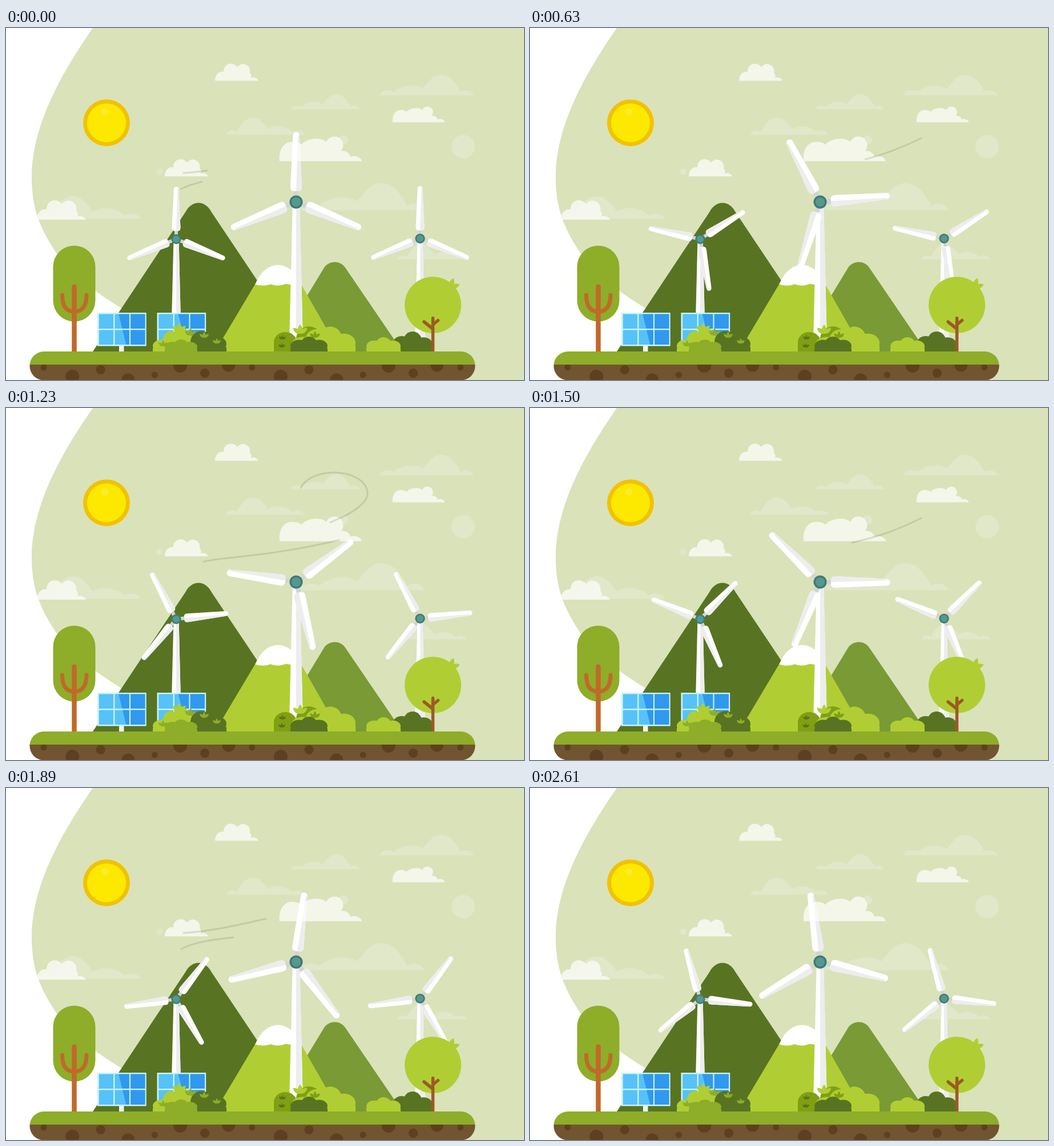
An HTML page that plays this animation: 907 by 617 pixels, repeating every 2.64 s.

```html
<!DOCTYPE html>
<html lang="en">
<head>
<meta charset="utf-8">
<title>Wind farm</title>
<style>
html, body { margin: 0; width: 100%; height: 100%; overflow: hidden; background: #fff; }
svg { display: block; width: 100%; height: 100%; }
.mist { fill: #e1e7c9; }
.cloud { fill: #fff; fill-opacity: .69; }
.light { fill: #b0ce33; }
.olive { fill: #8ead29; }
.moss { fill: #80a012; }
.dark { fill: #587422; }
.grey { fill: #ededee; }
.wind { fill: none; stroke: #5a6432; stroke-opacity: .18; stroke-width: 3; stroke-linecap: round; }
.branch { fill: none; stroke-linecap: round; stroke-linejoin: round; }
</style>
</head>
<body>
<svg viewBox="0 0 907 617">
  <defs>
    <path id="hill" d="M0 36C3 27 15 25 26 30C38 18 62 15 76 24C88 8 96 0 108 0C122 0 133 12 142 30C150 25 161 27 165 36Z"/>
    <path id="puff" d="M0 30C0 20 6 13 15 14C15 5 21 0 28 0C33 0 37 3 39 6C41 3 45 .5 49 .5C58 1 63 9 61 16C64 19 64 22 63 25C68 23 74 25 76 30Z"/>
    <path id="bank" d="M0 43C-2 22 8 9 22 9C30 9 35 11 38 14C48 2 72 0 82 9C86 -1 98 -3 106 3C114 11 112 22 107 25C116 24 123 29 124 35C133 32 143 36 144 43Z"/>
    <path id="leaf" d="M0 0Q-6 -6 0 -13Q6 -6 0 0Z"/>
    <g id="blade">
      <path fill="#d3d4d4" d="M-4 -8H4V-22H-4Z"/>
      <path fill="#fff" d="M-10 -27Q-10 -19 -4 -19H4Q10 -19 10 -27L5.7 -117A5.7 5.7 0 0 0 -5.7 -117Z"/>
      <path class="grey" d="M0 -19H4Q10 -19 10 -27L5.7 -116L3 -117Z"/>
    </g>
    <g id="rotor">
      <use href="#blade"/>
      <use href="#blade" transform="rotate(112)"/>
      <use href="#blade" transform="rotate(-112) scale(-1 1)"/>
    </g>
    <g id="hub">
      <circle r="11.5" fill="#3f7b76"/>
      <circle r="8" fill="#569890"/>
    </g>
    <clipPath id="sky"><path d="M152 0C105 68 45 165 45 262C45 320 62 355 90 397C115 434 160 465 205 493L400 617H907V0Z"/></clipPath>
    <clipPath id="cut"><path d="M196.500 498H250V560H211.500Z"/></clipPath>
    <clipPath id="ground"><rect x="41.500" y="567" width="780" height="50.500" rx="25"/></clipPath>
    <clipPath id="soil"><rect x="41" y="590" width="781" height="27"/></clipPath>
    <path id="peak" d="M366 567L438 446C455 405 497 405 515 446L584 567Z"/>
    <clipPath id="summit"><use href="#peak"/></clipPath>
    <g id="panel">
      <rect x="198" y="556" width="8.500" height="12" fill="#f1f2f2"/>
      <rect x="160" y="499" width="85.700" height="58.500" fill="#c9f3f5"/>
      <g id="cells" fill="#56c2f8"></g>
      <g id="shade" fill="#3099ee" clip-path="url(#cut)"></g>
    </g>
  </defs>

  <g clip-path="url(#sky)">
    <rect width="907" height="617" fill="#dae2ba"/>
    <g id="mists" class="mist">
      <circle cx="800.500" cy="208" r="20.500"/>
      <circle cx="591" cy="196" r="8"/>
      <circle cx="268.500" cy="252" r="5.500"/>
    </g>
    <g class="cloud">
      <use href="#puff" x="366" y="62.500"/>
      <use href="#puff" x="278" y="230"/>
      <use href="#puff" transform="translate(54 302) scale(1.13)"/>
    </g>
  </g>

  <circle cx="176" cy="166.200" r="41" fill="#f1c202"/>
  <circle cx="176" cy="166.200" r="34" fill="#fde900"/>
  <circle cx="173" cy="147" r="6.500" fill="#fbeb2c"/>

  <path class="dark" d="M152 567L314 323C325 301 349 301 360 323L523 567Z"/>
  <path fill="#7a9a35" d="M468 567L556.500 421C565 407 585 407 594 420L694 567Z"/>
  <use href="#peak" class="light"/>
  <path clip-path="url(#summit)" fill="#fff" d="M430 447Q450 455 463 449Q476 454 490 448.500Q504 451 522 452V400H430Z"/>

  <g id="turbines"></g>
  <g class="cloud">
    <use href="#bank" x="479" y="190.500"/>
    <use href="#bank" transform="translate(677 138) scale(.635)"/>
  </g>
  <path id="low" class="wind" pathLength="1" d="M307 282C335 268 370 265 398 262C455 256 510 248 559 237C610 226 645 213 685 193"/>
  <path id="high" class="wind" pathLength="1" d="M311 254C350 252 400 242 442 232C490 221 545 212 578 196C610 183 633 165 633 150C633 128 605 113 575 113C540 113 515 130 515 147C515 165 535 178 565 171"/>

  <use href="#panel"/>
  <use href="#panel" x="104.500"/>

  <rect class="olive" x="82.500" y="381.500" width="74" height="133" rx="37"/>
  <g class="branch" stroke="#c0692a">
    <path stroke-width="8.500" d="M119.500 453.500V572"/>
    <path stroke-width="7" d="M98.500 468C98.500 488 106 497 119.500 497C133 497 141 488 141 468"/>
  </g>

  <g id="bushes"></g>

  <g class="light">
    <circle cx="747.500" cy="485.500" r="49.500"/>
    <use href="#leaf" transform="translate(778 455) rotate(18) scale(1.35)"/>
    <use href="#leaf" transform="translate(778 455) rotate(72) scale(1.35)"/>
  </g>
  <path class="branch" stroke="#9c5a24" stroke-width="5.500" d="M747.500 572V508.500M732 515L747.500 527.500M756.500 512.500L747.500 520"/>

  <g clip-path="url(#ground)">
    <rect class="olive" x="41" y="567" width="781" height="24"/>
    <rect x="41" y="590" width="781" height="28" fill="#715430"/>
    <g id="rocks" fill="#5f3f20" clip-path="url(#soil)"></g>
  </g>
</svg>
<script>
const $ = id => document.getElementById(id);
const FLOOR = 567;

function add(parent, tag, attrs = {}) {
  const el = document.createElementNS('http://www.w3.org/2000/svg', tag);
  for (const k in attrs) el.setAttribute(k, attrs[k]);
  return parent.appendChild(el);
}

// Faint cloud; a negative width mirrors it, so x is then the right edge
function mist(x, y, w) {
  const s = w / 165;
  add($('mists'), 'use', { href: '#hill', transform: `translate(${x} ${y}) scale(${s} ${Math.abs(s)})` });
}
mist(654, 82, 165);
mist(499, 116, 121);
mist(522, 157, -137);
mist(515, 272, 218);
mist(236, 295, -182);
mist(806, 379, -121);

for (let i = 0; i < 6; i++) {
  const box = { x: 162.800 + i % 3 * 27.700, y: 501.500 + (i > 2) * 28, width: 25.300, height: 25.500 };
  add($('cells'), 'rect', box);
  add($('shade'), 'rect', box);
}

// Overlapping round lobes under a sine envelope; skew above 1 moves the top right
function bush(cls, left, right, height, lobes, skew = 1) {
  const g = add($('bushes'), 'g', { class: cls });
  const w = right - left, r = w / 2 / (1 + .6 * (lobes - 1));
  for (let i = 0; i < lobes; i++) {
    const u = (i + .5) / lobes;
    const cx = left + r + (w - 2 * r) * (lobes > 1 ? i / (lobes - 1) : 0);
    const h = r + (height - r) * Math.sin(Math.PI * u ** skew);
    add(g, 'rect', { x: cx - r, y: FLOOR - h, width: 2 * r, height: h + 1, rx: r });
    add(g, 'rect', { x: cx - r, y: FLOOR - h + r, width: 2 * r, height: h - r + 1 });
  }
}

function tuft(cls, x, y, s) {
  for (let a = -50; a <= 50; a += 50)
    add($('bushes'), 'use', { href: '#leaf', class: cls, transform: `translate(${x} ${y}) rotate(${a}) scale(${s})` });
}

bush('light', 257, 340, 42, 4, 1.3);
tuft('light', 303, 532, 1.2);
tuft('olive', 275, 558, .8);
tuft('olive', 323, 539, 1);
bush('dark', 323, 386, 36, 2, .6);
tuft('olive', 347, 543, .8);
tuft('olive', 369, 553, .7);
bush('olive', 278, 335, 21, 3);

bush('moss', 469, 509, 34, 1);
bush('moss', 508, 553, 44, 1);
tuft('dark', 484, 546, .6);
tuft('dark', 483, 560, .6);
bush('light', 500, 612, 44, 4, 1.25);
tuft('light', 515, 536, 1.25);
tuft('moss', 541, 543, .9);
bush('dark', 498, 563, 26, 3);

function turbine(x, y, s, speed, base) {
  const g = add($('turbines'), 'g');
  const a = 6.2 * s, b = a + (base - y) * .0235;
  const mast = (cls, k) => add(g, 'path', {
    class: cls, fill: '#fff', d: `M${x - a * k} ${y + 5}H${x + a}L${x + b} ${base}H${x - b * k}Z`
  });
  mast('', 1);
  mast('grey', 0);
  const spin = add(g, 'use', { href: '#rotor' });
  add(g, 'use', { href: '#hub', transform: `translate(${x} ${y}) scale(${s})` });
  return deg => spin.setAttribute('transform', `translate(${x} ${y}) rotate(${deg * speed}) scale(${s})`);
}
const rotors = [
  turbine(725, 369, .75, 2, FLOOR),
  turbine(298, 370, .75, 2, 512),
  turbine(508, 305, 1, 1, 545)
];

bush('dark', 677, 747, 35, 3, .9);
bush('light', 631, 691, 25, 3);

// Rocks: evenly spread with a slow sway, sizes and depths in repeating cycles
const sizes = [5.5, 12, 8, 11.5], depths = [595, 611, 599, 617, 608, 592, 605, 591];
for (let i = 0; i < 17; i++)
  add($('rocks'), 'circle', {
    cx: 66 + 45.6 * i + 12 * Math.abs(Math.sin(Math.PI * i / 8)),
    cy: depths[i % 8],
    r: sizes[i % 4]
  });

const STEP = 30, COUNT = 88, TURN = 89, GUST = 30;
const ramp = (p, from, to) => Math.min(1, Math.max(0, (p - from) / (to - from)));
const smooth = x => x * x * (3 - 2 * x);

// Shows the part of a wind line between tail and head
function sweep(el, tail, head) {
  const len = head - tail;
  el.style.display = len > .003 ? '' : 'none';
  el.setAttribute('stroke-dasharray', `${Math.max(len, 0)} 3`);
  el.setAttribute('stroke-dashoffset', -tail);
}

function draw(ms) {
  const n = Math.floor(ms / STEP) % COUNT;
  rotors.forEach(turn => turn(n * 360 / TURN));
  const p = (n + 3) % GUST;
  sweep($('low'), ramp(p, 12.3, 28.3), ramp(p, 0, 18) ** 1.3);
  sweep($('high'), ramp(p, 7, 22), smooth(ramp(p, 0, 18)));
}

let start;
function tick(now) {
  start ??= now;
  draw(now - start);
  requestAnimationFrame(tick);
}
draw(0);
requestAnimationFrame(tick);
</script>
</body>
</html>
```
